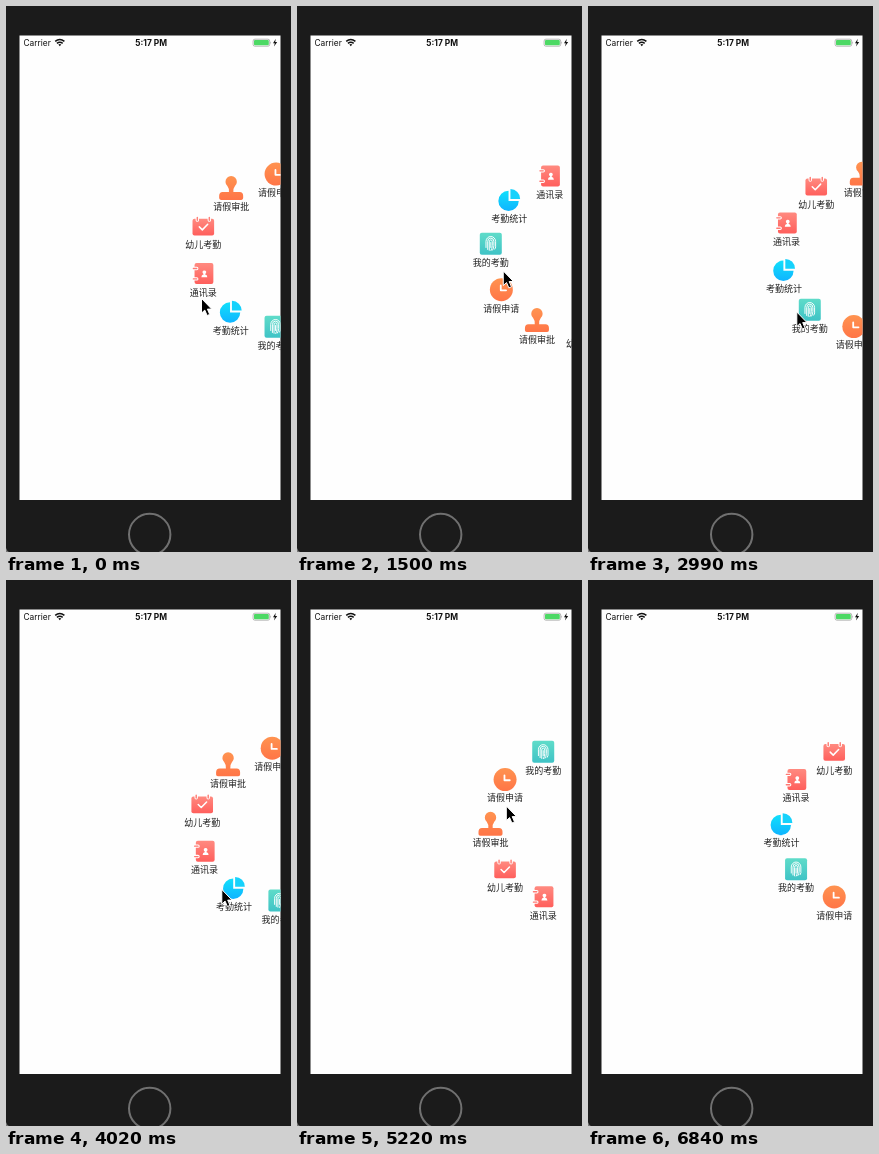
Animation of 285x546 px, one loop 7.63 s. Source, as an HTML page:

```html
<!DOCTYPE html>
<html lang="zh">
<head>
<meta charset="utf-8">
<title>Rotary menu</title>
<style>
html, body { margin: 0; width: 100%; height: 100%; overflow: hidden; background: #1b1b1b; }
svg { display: block; width: 100%; height: 100%; }
.label { font: 9px "Noto Sans CJK SC", "Noto Sans CJK", sans-serif; fill: #222; text-anchor: middle; }
.bar { font: 8.4px Inter, sans-serif; fill: #111; }
.clock { font-weight: 700; text-anchor: middle; }
.line { fill: none; stroke: #fff; stroke-linecap: round; stroke-linejoin: round; }
</style>
</head>
<body>
<svg viewBox="0 0 285 546">
  <defs>
    <linearGradient id="orange" x2="0" y2="1"><stop stop-color="#ff9350"/><stop offset="1" stop-color="#ff7547"/></linearGradient>
    <linearGradient id="red" x2="0" y2="1"><stop stop-color="#ff8a80"/><stop offset="1" stop-color="#ff5f5c"/></linearGradient>
    <linearGradient id="blue" x2="0" y2="1"><stop stop-color="#12e0fb"/><stop offset="1" stop-color="#0fb4ff"/></linearGradient>
    <linearGradient id="teal" x2="0" y2="1"><stop stop-color="#5fdcc9"/><stop offset="1" stop-color="#3fc3c6"/></linearGradient>
    <clipPath id="screen"><rect x="13" y="29" width="261.5" height="465"/></clipPath>
  </defs>

  <rect width="285" height="546" fill="#1b1b1b"/>
  <path d="M0 542Q1 545 3 546H0Z" fill="#777"/>
  <rect x="13.5" y="29.5" width="261" height="464.5" fill="#fefefe"/>
  <circle cx="143.7" cy="528.5" r="20.7" fill="none" stroke="#707070" stroke-width="2"/>

  <!-- status bar -->
  <text class="bar" x="17.5" y="39.8">Carrier</text>
  <g fill="none" stroke="#111" stroke-width="1.5">
    <path d="M49.2 35.4Q53.8 31.7 58.4 35.4M50.9 37.4Q53.8 35 56.7 37.4"/>
    <path d="M53.8 40.2L52.3 38.6Q53.8 37.5 55.3 38.6Z" fill="#111" stroke="none"/>
  </g>
  <text class="bar clock" x="145.2" y="39.8">5:17 PM</text>
  <rect x="247.1" y="33.2" width="16.6" height="7" rx="1.8" fill="#fff" stroke="#8a8a8a" stroke-width=".6"/>
  <rect x="248" y="34.1" width="14.8" height="5.2" rx="1" fill="#4cd964"/>
  <path d="M264.5 35.5Q265.8 36.7 264.5 38Z" fill="#8a8a8a"/>
  <path d="M269.8 32.8L267 37.2H268.8L268 40.6L271.2 36H269.2Z" fill="#111"/>

  <g clip-path="url(#screen)">
    <g class="item">
      <rect x="-10.8" y="-7.6" width="21.6" height="16.8" rx="2" fill="url(#red)"/>
      <path d="M-6 -8.6V-6.2M6 -8.6V-6.2" class="line" stroke-width="3.4"/>
      <path d="M-6 -8.8V-6M6 -8.8V-6" fill="none" stroke="#ff8178" stroke-width="1.5" stroke-linecap="round"/>
      <path d="M-4 .5L-1 3.5L4.4 -2.1" class="line" stroke-width="1.5"/>
      <text class="label" y="22.1">幼儿考勤</text>
    </g>
    <g class="item">
      <rect x="-8.6" y="-10.4" width="18.8" height="21" rx="2" fill="url(#red)"/>
      <path d="M-9.2 -5H-6.4M-9.2 5.4H-6.4" class="line" stroke-width="3.4"/>
      <path d="M-9.8 -5H-6.4M-9.8 5.4H-6.4" fill="none" stroke="#ff7a74" stroke-width="1.3" stroke-linecap="round"/>
      <path d="M-1.8 3.8Q-1.8 1.3 .6 .8Q-.9 -.4 -.7 -1.7A2 2 0 0 1 3.1 -1.7Q3.3 -.4 1.8 .8Q4.2 1.3 4.2 3.8Z" fill="#fff"/>
      <text class="label" y="22.1">通讯录</text>
    </g>
    <g class="item">
      <path d="M-.7 -9.4A10.2 10.2 0 1 0 9.5 .8H-.7Z" fill="url(#blue)"/>
      <path d="M1.2 -11A9.7 9.7 0 0 1 10.9 -1.2H1.2Z" fill="#16d2fc"/>
      <text class="label" y="22.1">考勤统计</text>
    </g>
    <g class="item">
      <rect x="-11" y="-10.8" width="22" height="22" rx="2" fill="url(#teal)"/>
      <g class="line" stroke-width=".95">
        <path d="M-4.8 4V-2A4.8 5 0 0 1 4.8 -2V3"/>
        <path d="M-3.1 6V-1.8A3.1 3.6 0 0 1 3.1 -1.8V2Q3 5 1.8 6.6"/>
        <path d="M-1.5 6.8V-1.6A1.5 2 0 0 1 1.5 -1.6V2Q1.4 5 .2 7"/>
        <path d="M0 -1V4M4.8 3.8L4 5.6"/>
      </g>
      <text class="label" y="22.1">我的考勤</text>
    </g>
    <g class="item">
      <circle cy=".2" r="11.5" fill="url(#orange)"/>
      <path d="M-.6 -4V.9H4.7" class="line" stroke-width="1.8"/>
      <text class="label" y="22.1">请假申请</text>
    </g>
    <g class="item">
      <path d="M-2.2 3.8Q-1.6 .5 -3.8 -2.4A5.7 5.7 0 1 1 3.8 -2.4Q1.6 .5 2.2 3.8H8.5Q12 4 12 7.5V9.8Q12 11.6 10.2 11.6H-10.2Q-12 11.6 -12 9.8V7.5Q-12 4 -8.5 3.8Z" fill="url(#orange)"/>
      <text class="label" y="22.1">请假审批</text>
    </g>
  </g>

  <path id="cursor" d="M0 0V14.6L3.3 11.6L5.6 17L8.2 15.9L5.9 10.6H10.2Z" stroke="#fff" stroke-linejoin="round"/>
</svg>
<script>
const LOOP = 7630, TICK = 148.6;             // ms per loop and per screen update
const STEP = 36, CX = 269.8, CY = 244.2, R = 76.3;
const SWIPE_TOP = 226, DRAG_SPEED = 12;      // px, degrees per tick
const LEAVE = 46;                            // tick at which the pointer is gone

const items = [...document.querySelectorAll('.item')];
const cursor = document.getElementById('cursor');

// Swipe poses; the wheel rests wherever its angle is a whole slot.
const poses = [
  { at: 0, angle: -18.2, x: 195.5, y: 292.5 },
  { at: 5, angle: 67.5, x: 212.5, y: 231 },
  { at: 14, angle: 108, x: 201.8, y: 297.5 },
  { at: 20, angle: 159, x: 208.8, y: 306 },
  { at: 27, angle: 200.7, x: 215.8, y: 309.5 },
  { at: 35, angle: 252, x: 209.3, y: 226 },
  { at: 44, angle: 360, x: 254.5, y: 539 }
];

const mix = (a, b, u) => a + (b - a) * u;
const ease = u => u * u * (3 - 2 * u);
const speed = pose => pose.angle % STEP ? DRAG_SPEED : 0;

function stateAt(tick) {
  const next = Math.max(1, poses.findIndex(p => p.at > tick));
  const i = tick >= poses.at(-1).at ? poses.length - 1 : next;
  const a = poses[i - 1], b = poses[i];
  const span = b.at - a.at, u = Math.min(1, (tick - a.at) / span), v = 1 - u;
  // Between two low poses the pointer goes back up for the next swipe.
  const lift = (Math.min(a.y, b.y) - SWIPE_TOP) * Math.sin(Math.PI * u) ** 2;
  const leaving = i === poses.length - 1;
  const glide = leaving ? u ** 4 : ease(u);
  return {
    angle: mix(a.angle, b.angle, ease(u)) + span * u * v * (v * speed(a) - u * speed(b)),
    x: mix(a.x, b.x, glide),
    y: mix(a.y, b.y, glide) - lift
  };
}

function draw(time) {
  const tick = Math.floor(time / TICK);
  const { angle, x, y } = stateAt(tick);
  const turn = STEP * items.length;
  items.forEach((el, k) => {
    const deg = k * STEP + angle + turn / 2;
    const a = (deg - Math.floor(deg / turn) * turn - turn / 2) * Math.PI / 180;
    el.setAttribute('transform', `translate(${CX - R * Math.cos(a)} ${CY + R * Math.sin(a)})`);
  });
  cursor.setAttribute('transform', `translate(${x} ${y})`);
  cursor.setAttribute('visibility', tick < LEAVE ? 'visible' : 'hidden');
}

const start = performance.now();
function frame() {
  draw((performance.now() - start) % LOOP);
  requestAnimationFrame(frame);
}
frame();
</script>
</body>
</html>
```
